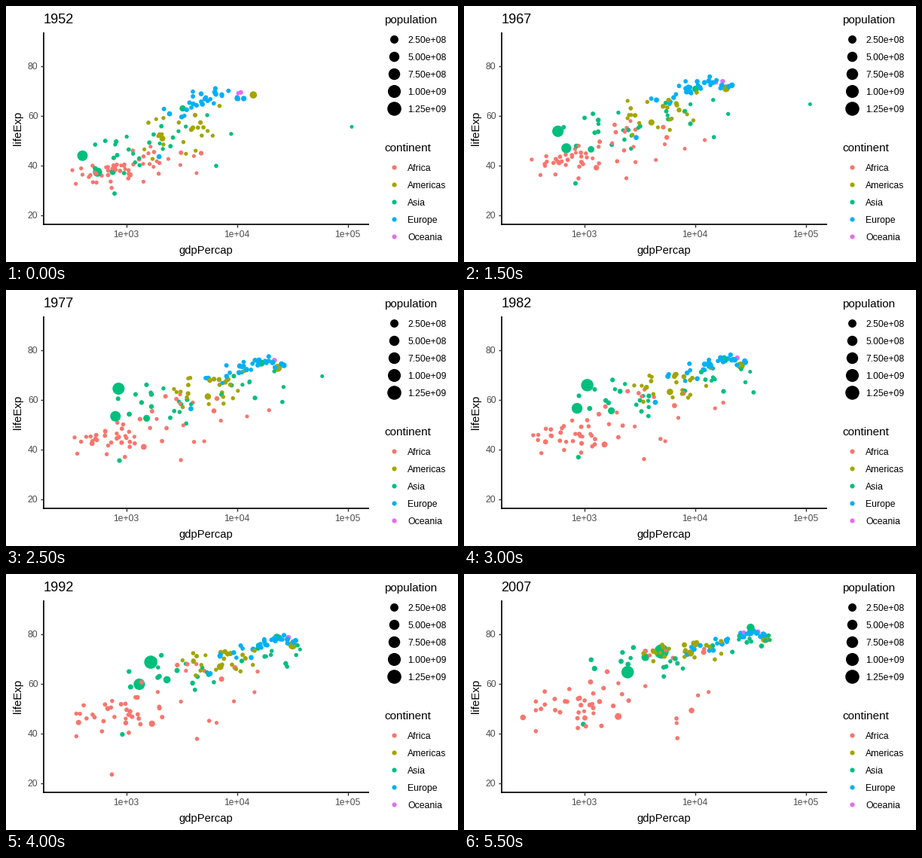
These frames come from a looping animation (600x340 px, 6 s). A matplotlib script:

```python
import matplotlib.pyplot as plt
import numpy as np
from matplotlib.animation import FuncAnimation

WIDTH, HEIGHT, DPI = 600, 340, 100
PT = 72 / DPI  # points per pixel
YEARS = np.arange(1952, 2008, 5)
PROGRESS = (YEARS - 1952) / 55
COLORS = {"Africa": "#F8766D", "Americas": "#A3A500", "Asia": "#00BF7D",
          "Europe": "#00B0F6", "Oceania": "#E76BF3"}
GROWTH = {"Africa": 3.6, "Americas": 2.3, "Asia": 2.45, "Europe": 1.25, "Oceania": 2.2}

rng = np.random.default_rng(7)
dots = []


def to_x(log_gdp):
    return 160 + 146.9 * (log_gdp - 3)


def to_y(life):
    return 278.2 - 3.308 * (life - 20)


def radius(millions):
    return 2.37 + 7.1 * np.sqrt(millions / 1318.7)


def add_dot(continent, millions, log_gdp, life):
    growth = GROWTH[continent] ** PROGRESS
    dots.append((COLORS[continent], to_x(log_gdp), to_y(life), radius(millions * growth)))


def track(continent, millions, *keys):
    """One striking dot, led through a few (year, gdp, life) points."""
    years, gdp, life = np.transpose(keys)
    add_dot(continent, millions, np.interp(YEARS, years, np.log10(gdp)),
            np.interp(YEARS, years, life))


def cluster(continent, count, millions, start, end):
    """A cloud easing between two (log gdp, spread, life, spread) states."""
    gdp, gdp_sd, life, life_sd = (
        a + (b - a) * PROGRESS**ease
        for a, b, ease in zip(start, end, (0.65, 0.8, 0.75, 0.8)))
    for _ in range(count):
        wealth, health = np.clip(rng.normal(size=2), -1.8, 1.8)
        health = 0.4 * wealth + 0.9 * health
        drift = rng.normal(0, 0.14, (2, len(YEARS))).cumsum(axis=1)
        add_dot(continent, millions * np.exp(rng.normal(0, 0.8)),
                gdp + gdp_sd * np.clip(wealth + drift[0], -2, 2),
                life + life_sd * np.clip(health + drift[1], -2, 2))


track("Asia", 556, (1952, 400, 44), (1962, 488, 44.5), (1972, 677, 63.1),
      (1992, 1656, 68.7), (2007, 4959, 73))
track("Asia", 372, (1952, 547, 37.4), (1982, 856, 56.6), (2007, 2452, 64.7))
track("Asia", 82, (1952, 750, 37.5), (2007, 3541, 70.7))
track("Asia", 86, (1952, 3217, 63), (1972, 14779, 73.4), (2007, 31656, 82.6))
track("Asia", 0.3, (1952, 108382, 55.6), (1972, 109348, 67.7), (1982, 31354, 71.3),
      (2007, 47307, 77.6))
track("Asia", 4, (1952, 6460, 39.9), (1982, 33693, 63), (2007, 21655, 72.8))
track("Asia", 8.4, (1952, 779, 28.8), (2007, 975, 43.8))
track("Americas", 157, (1952, 13990, 68.4), (2007, 42952, 78.2))
track("Americas", 62, (1952, 2109, 50.9), (1972, 4986, 59.5), (2007, 9066, 72.4))
track("Europe", 25, (1952, 1969, 43.6), (2007, 8458, 71.8))
track("Africa", 33, (1952, 1077, 36.3), (2007, 2014, 46.9))
track("Africa", 14, (1952, 4725, 45), (1992, 7225, 61.9), (2007, 9270, 49.3))
track("Africa", 14, (1952, 781, 39.1), (2007, 278, 46.5))
track("Africa", 2.5, (1952, 493, 40), (1987, 848, 44), (1992, 737, 23.6), (2007, 863, 46.2))
track("Africa", 1, (1952, 2388, 42.7), (1972, 21011, 52.8), (2007, 12057, 74))
track("Africa", 0.4, (1952, 4293, 37), (1982, 15113, 56.6), (2007, 13206, 56.7))

cluster("Africa", 36, 3, (2.96, 0.24, 39, 4), (3.08, 0.26, 54, 6.5))
cluster("Africa", 6, 4, (3.29, 0.12, 46, 4), (3.83, 0.14, 73, 1.6))
cluster("Africa", 4, 1, (3.3, 0.2, 41, 4), (3.8, 0.2, 48, 5))
cluster("Americas", 23, 4, (3.5, 0.2, 54.5, 6), (3.9, 0.2, 73.7, 2.3))
cluster("Asia", 18, 6, (3.03, 0.24, 46, 6), (3.62, 0.28, 70, 4))
cluster("Asia", 8, 2.5, (3.42, 0.27, 55, 6), (4.47, 0.11, 78.5, 1.7))
cluster("Europe", 17, 14, (3.84, 0.14, 67.5, 2.4), (4.53, 0.06, 80, 0.7))
cluster("Europe", 12, 9, (3.56, 0.15, 62.5, 3), (4.13, 0.14, 75, 1.5))
cluster("Oceania", 2, 4, (4.02, 0.01, 69.2, 0.2), (4.47, 0.07, 80.7, 0.5))

dots = [dots[i] for i in rng.permutation(len(dots))]
dot_colors, xs, ys, radii = zip(*dots)
xs, ys, radii = map(np.array, (xs, ys, radii))


plt.rcParams["font.family"] = "Liberation Sans"
fig = plt.figure(figsize=(WIDTH / DPI, HEIGHT / DPI), dpi=DPI, facecolor="white")
ax = fig.add_axes([0, 0, 1, 1])
ax.set(xlim=(0, WIDTH), ylim=(HEIGHT, 0))
ax.axis("off")


def area(r):
    return (2 * np.asarray(r) * PT) ** 2


def circles(x, y, r, color):
    return ax.scatter(x, y, s=area(r), c=color, lw=0, zorder=3, snap=False)


def label(x, y, text, size, color="black", **kwargs):
    return ax.text(x, y, text, fontsize=size * PT, color=color, va="baseline", **kwargs)


def line(x, y, color="black", width=1.7):
    ax.plot(x, y, color=color, lw=width * PT, solid_capstyle="butt")


# axes
line([50, 50], [35, 291])
line([49, 482], [290, 290])
for life in (20, 40, 60, 80):
    y = to_y(life)
    line([46, 50], [y, y], "#333333", 1.4)
    label(42.5, y + 4.3, str(life), 12.1, "#4D4D4D", ha="right")
for power in (3, 4, 5):
    x = to_x(power)
    line([x, x], [290, 294], "#333333", 1.4)
    label(x - 0.3, 307.3, f"1e+0{power}", 12.1, "#4D4D4D", ha="center")
label(265.5, 329, "gdpPercap", 14.8, ha="center")
label(20.3, 162, "lifeExp", 15, ha="center", rotation=90, rotation_mode="anchor")

# legends
label(502.5, 23, "population", 15.2)
for i in range(5):
    people, y = 250 * (i + 1), 44.2 + 23 * i
    circles(515, y, radius(people), "black")
    label(533, y + 4.5, f"{people * 1e6:.2e}", 12.2)
label(502.5, 193, "continent", 15.2)
for i, (name, color) in enumerate(COLORS.items()):
    y = 214.1 + 23 * i
    circles(515, y, 3.08, color)
    label(533, y + 4.5, name, 12.2)

title = label(49.5, 23, "", 18.2)
points = circles(xs[:, 0], ys[:, 0], radii[:, 0], dot_colors)


def update(frame):
    title.set_text(str(YEARS[frame]))
    points.set_offsets(np.column_stack([xs[:, frame], ys[:, frame]]))
    points.set_sizes(area(radii[:, frame]))
    return title, points


animation = FuncAnimation(fig, update, frames=len(YEARS), interval=500, repeat=True)
plt.show()
```
